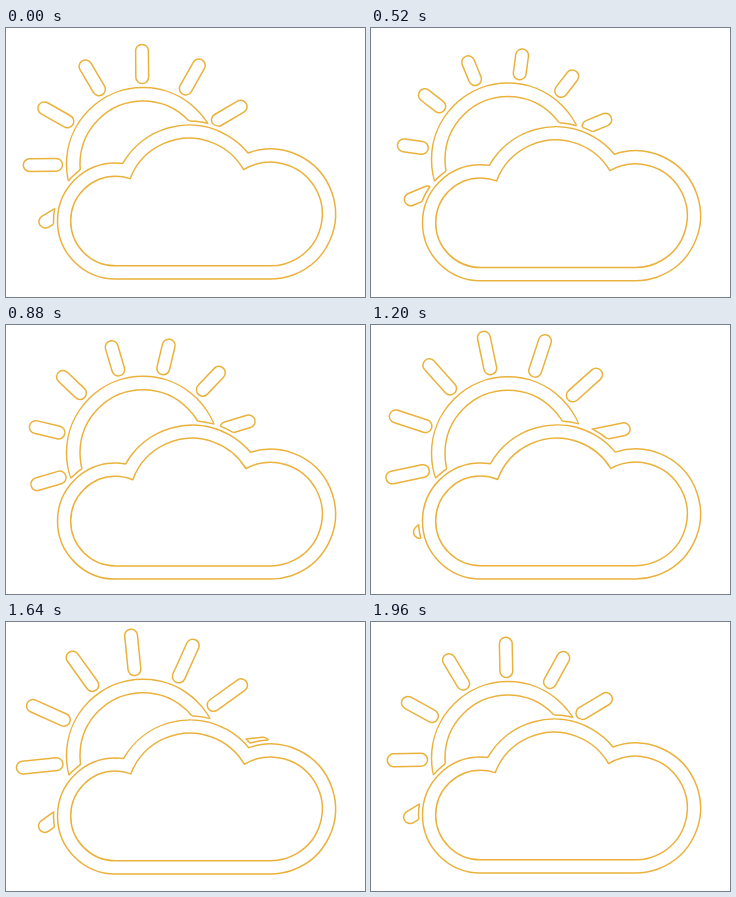
An HTML page with a canvas that plays this animation: 359 px wide and 269 px high, repeating every 2 s.

```html
<!DOCTYPE html>
<html lang="en">
<head>
<meta charset="utf-8">
<title>Sun behind a cloud</title>
<style>
  html, body { margin: 0; width: 100%; height: 100%; overflow: hidden; background: #fff; }
  canvas { display: block; }
</style>
</head>
<body>
<canvas id="stage" width="359" height="269"></canvas>
<script>
const ctx = document.getElementById('stage').getContext('2d');
const LOOP = 2000, STEP = 40, TAU = Math.PI * 2;
const INK = '#eab23c';

const SUN = { x: 137, outer: 76.5, inner: 63 };
const RAY = { count: 12, start: 80.5, half: 6.4 };
const LEFT = { x: 109.5, y: 193, r: 58 };
const MID = { x: 183, y: 173.3, r: 76.3 };
const RIGHT = { x: 264.5, y: 186, r: 65 };
const BASE = 251, RIM = 13.2, GAP = 4;

// Upper crossing point of two circles, a lying left of b
function crossing(a, b) {
  const dx = b.x - a.x, dy = b.y - a.y, d = Math.hypot(dx, dy);
  const along = (a.r * a.r - b.r * b.r + d * d) / (2 * d);
  const off = Math.sqrt(a.r * a.r - along * along);
  return { x: a.x + (along * dx + off * dy) / d, y: a.y + (along * dy - off * dx) / d };
}

const angleTo = (c, p) => Math.atan2(p.y - c.y, p.x - c.x);

// Cloud outline, grown by the given amount; only the middle bump drifts sideways
function cloudPath(grow, drift) {
  const place = (c, dx) => ({ x: c.x + dx, y: c.y + drift, r: c.r + grow });
  const l = place(LEFT, 0), m = place(MID, drift), r = place(RIGHT, 0);
  const p = crossing(l, m), q = crossing(m, r);
  const path = new Path2D();
  path.arc(l.x, l.y, l.r, Math.PI / 2, angleTo(l, p));
  path.arc(m.x, m.y, m.r, angleTo(m, p), angleTo(m, q));
  path.arc(r.x, r.y, r.r, angleTo(r, q), Math.PI / 2);
  path.closePath();
  return path;
}

// Ring and rays in one path
function sunPath(cy, turn, reach) {
  const path = new Path2D();
  for (const r of [SUN.outer, SUN.inner]) {
    path.moveTo(SUN.x + r, cy);
    path.arc(SUN.x, cy, r, 0, TAU);
  }
  const near = RAY.start + RAY.half, far = reach - RAY.half;
  for (let i = 0; i < RAY.count; i++) {
    const a = turn + i * TAU / RAY.count;
    const ux = Math.cos(a), uy = Math.sin(a);
    path.moveTo(SUN.x + far * ux + RAY.half * uy, cy + far * uy - RAY.half * ux);
    path.arc(SUN.x + far * ux, cy + far * uy, RAY.half, a - Math.PI / 2, a + Math.PI / 2);
    path.arc(SUN.x + near * ux, cy + near * uy, RAY.half, a + Math.PI / 2, a + Math.PI * 1.5);
    path.closePath();
  }
  return path;
}

function draw(t) {
  const phase = t / LOOP * TAU, swing = Math.cos(phase);
  const sunY = 131.8 + 4.3 * swing;
  const reach = 119.7 - 8.2 * Math.sin(phase);
  const turn = (t / LOOP * 30 - 0.1 - 0.4 * swing) * Math.PI / 180;
  const drift = 1.6 * (1 - swing);
  const sun = sunPath(sunY, turn, reach);
  const halo = cloudPath(GAP, drift);

  ctx.fillStyle = '#fff';
  ctx.fillRect(0, 0, 359, 269);
  ctx.strokeStyle = INK;
  ctx.lineWidth = 1.5;
  ctx.lineJoin = 'round';

  // Cut the sun along the halo, close the cut ends, show nothing below the cloud
  ctx.save();
  ctx.beginPath();
  ctx.rect(0, 0, 359, BASE);
  ctx.clip();
  ctx.stroke(sun);
  ctx.fill(halo);
  ctx.clip(sun, 'evenodd');
  ctx.stroke(halo);
  ctx.restore();

  ctx.stroke(cloudPath(0, drift));
  ctx.stroke(cloudPath(-RIM, drift));
}

const began = performance.now();
function tick() {
  const t = (performance.now() - began) % LOOP;
  draw(Math.floor(t / STEP) * STEP);
  requestAnimationFrame(tick);
}
tick();
</script>
</body>
</html>
```
